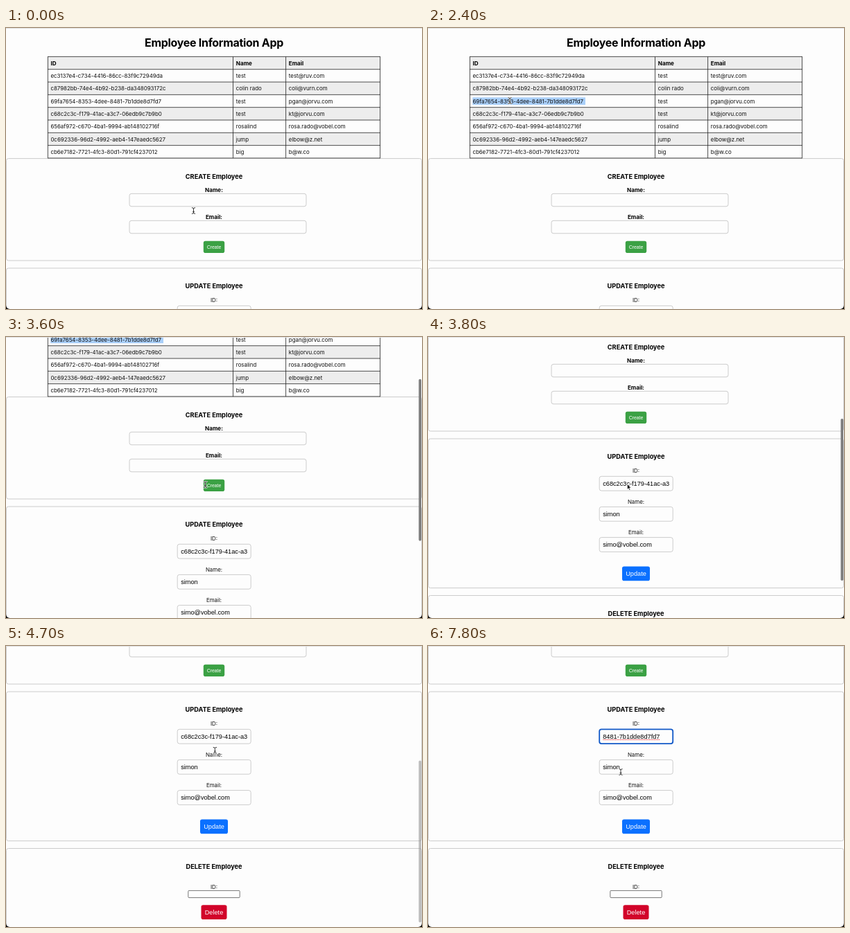
An HTML page that plays this animation: 600x406 px, repeating every 8000 ms.

```html
<!DOCTYPE html>
<html lang="en">
<head>
<meta charset="utf-8">
<title>Employee Information App</title>
<style>
  html, body { margin: 0; height: 100%; overflow: hidden; background: #fdfdfd; }
  svg { display: block; width: 100%; height: 100%; }
  text { font: 7.9px Inter, Roboto, sans-serif; fill: #111; white-space: pre; }
  .mid { text-anchor: middle; }
  .bold { font-weight: 700; font-size: 8.1px; fill: #000; }
  .h1 { font-weight: 700; font-size: 16px; letter-spacing: -.3px; fill: #000; }
  .h3 { font-weight: 700; font-size: 9.2px; fill: #000; }
  .field { font: 9.2px "Liberation Sans", Arial, sans-serif; fill: #000; }
  .button { font: 9.2px "Liberation Sans", Arial, sans-serif; fill: #fff; }
  .small { font-size: 6.9px; }
</style>
</head>
<body>
<svg id="stage" viewBox="0 0 600 406"></svg>
<script>
const LOOP = 8000, STEP = 100;
const stage = document.getElementById('stage');

function add(parent, tag, attrs, content) {
  const node = document.createElementNS('http://www.w3.org/2000/svg', tag);
  for (const key in attrs) node.setAttribute(key, attrs[key]);
  if (content !== undefined) node.textContent = content;
  parent.appendChild(node);
  return node;
}
const page = add(stage, 'g', {});
const rect = (x, y, width, height, attrs) => add(page, 'rect', { x, y, width, height, ...attrs });
const text = (x, y, content, cls = '') => add(page, 'text', { x, y, class: cls }, content);
const label = (y, content, cls = '') => text(300, y, content, 'mid ' + cls);
const line = (x1, y1, x2, y2) => add(page, 'line', { x1, y1, x2, y2, stroke: '#222', 'stroke-width': .8 });
const box = (x, y, w, h, stroke = '#ccc', rx = 3) =>
  rect(x, y, w, h, { rx, fill: '#fdfdfd', stroke, 'stroke-width': 1 });
const highlight = (y, h) => rect(0, y, 0, h, { fill: '#a9cff9' });

function button(y, w, h, color, content, baseline, cls = '') {
  rect(300 - w / 2, y, w, h, { rx: 2.8, fill: color });
  label(baseline, content, 'button ' + cls);
}

// Employee table
const rows = [
  ['ID', 'Name', 'Email'],
  ['ec3137e4-c734-4416-86cc-83f9c72949da', 'test', 'test@ruv.com'],
  ['c87982bb-74e4-4b92-b238-da348093172c', 'colin rado', 'coli@vurn.com'],
  ['69fa7654-8353-4dee-8481-7b1dde8d7fd7', 'test', 'pgan@jorvu.com'],
  ['c68c2c3c-f179-41ac-a3c7-06edb9c7b9b0', 'test', 'kt@jorvu.com'],
  ['656af972-c670-4ba1-9994-ab148102716f', 'rosalind', 'rosa.rado@vobel.com'],
  ['0c692336-96d2-4992-aeb4-147eaedc5627', 'jump', 'elbow@z.net'],
  ['cb6e7182-7721-4fc3-80d1-791cf4237012', 'big', 'b@w.co']
];
const TOP = 41.4, ROW = 18.32, BOTTOM = TOP + ROW * rows.length;
label(26.8, 'Employee Information App', 'h1');
rows.forEach((_, i) => {
  if (i % 2 === 0) rect(60, TOP + i * ROW, 480, ROW, { fill: '#ededed' });
});
const rowSelection = highlight(100.3, 10.7);
rows.forEach((cells, i) => {
  line(60, TOP + i * ROW, 540, TOP + i * ROW);
  cells.forEach((cell, c) =>
    text([64.4, 331.8, 407.8][c], 53.8 + i * ROW, cell, i ? '' : 'bold'));
});
[60.4, 327.5, 403.6, 539.6].forEach(x => line(x, TOP, x, BOTTOM));

// Create form
box(.5, 188.6, 599, 147.4);
line(60, BOTTOM, 540, BOTTOM);
label(217.6, 'CREATE Employee', 'h3');
label(237.4, 'Name:', 'bold');
box(178, 239.3, 255, 18.5);
label(276.4, 'Email:', 'bold');
box(178, 278.3, 255, 18.5);
button(307.7, 30.4, 17.4, '#3ba144', 'Create', 318.8, 'small');

// Update form
box(.5, 347, 599, 215.6);
label(375.7, 'UPDATE Employee', 'h3');
label(396.1, 'ID:');
const idBox = box(247.2, 401.3, 106, 20.8);
const idSelection = highlight(405, 12.5);
const idText = text(252.2, 414.6, '', 'field');
const spelling = add(page, 'line', {
  x1: 253, y1: 416.4, x2: 334, y2: 416.4, stroke: '#e8343a',
  'stroke-width': 1.1, 'stroke-linecap': 'round', 'stroke-dasharray': '0 1.75'
});
const caret = rect(347.8, 406, .8, 11, { fill: '#000' });
label(440.5, 'Name:');
box(247.2, 445.4, 106, 20.8);
text(252.2, 458.8, 'simon', 'field');
label(484.7, 'Email:');
box(247.2, 489.6, 106, 20.8);
text(252.2, 503, 'simo@vobel.com', 'field');
button(531.4, 40, 20.8, '#0a70ff', 'Update', 545.2);

// Delete form
box(.5, 573.5, 599, 140);
label(602.8, 'DELETE Employee', 'h3');
label(632.4, 'ID:');
box(262.8, 634.4, 74.4, 10.2, '#777', 1.2);
button(655.2, 37, 20.8, '#d2042a', 'Delete', 669);

// Window frame, scrollbar and pointer
const thumb = add(stage, 'rect', { x: 595.3, width: 3.7, height: 234, rx: 1.8, fill: '#7d7d7d' });
add(stage, 'rect', { width: 600, height: 1, fill: '#e2e2e2' });
add(stage, 'path', { d: 'M0 400.5Q.5 405.5 5.5 406H0ZM600 400.5Q599.5 405.5 594.5 406H600Z' });
const pointer = add(stage, 'g', {});
const beam = add(pointer, 'g', { fill: 'none', 'stroke-linecap': 'round' });
[['#fff', 2], ['#222', .9]].forEach(([stroke, width]) => add(beam, 'path', {
  d: 'M-2.2-4.3Q0-4.3 0-3Q0-4.3 2.2-4.3M0-3V3M-2.2 4.3Q0 4.3 0 3Q0 4.3 2.2 4.3M-1 1.4H1',
  stroke, 'stroke-width': width
}));
const arrow = add(pointer, 'path', {
  d: 'M0-.8V7L1.8 5.4L3 8.1L4.3 7.5L3.1 4.9H5.4Z',
  fill: '#111', stroke: '#fff', 'stroke-width': .6
});

// Keys are [time, ...values], joined by straight lines
const pointerPath = [
  [0, 270.5, 264], [100, 188, 153], [200, 188, 153], [500, 150, 126], [800, 122, 107],
  [1000, 118, 105], [2900, 118, 105], [3000, 225, 172], [3100, 287.4, 213.2],
  [4100, 287.4, 213.2], [4500, 296, 172], [4800, 304, 140], [5000, 306, 133.6],
  [6300, 306, 133.6], [6700, 291, 152], [7100, 279, 175], [7300, 278, 181.4], [7500, 278, 182]
];
const scrollPath = [
  [3200, 0], [3300, 8], [3400, 31], [3500, 64], [3600, 102], [3700, 150],
  [3800, 200], [3900, 246], [4000, 275], [4100, 281]
];
const fadePath = [[4400, 1], [5000, 0]];

function sample(keys, t) {
  const next = keys.findIndex(key => key[0] > t);
  if (next === 0) return keys[0].slice(1);
  if (next < 0) return keys[keys.length - 1].slice(1);
  const a = keys[next - 1], b = keys[next];
  const k = (t - a[0]) / (b[0] - a[0]);
  return a.slice(1).map((v, i) => v + (b[i + 1] - v) * k);
}
const show = (node, on) => node.setAttribute('visibility', on ? 'visible' : 'hidden');

function select(node, on, [from, to]) {
  show(node, on);
  node.setAttribute('x', from);
  node.setAttribute('width', to - from);
}

function draw(t) {
  const [scroll] = sample(scrollPath, t);
  const [x, y] = sample(pointerPath, t);
  const focused = t >= 5300, pasted = t >= 6300;

  page.setAttribute('transform', `translate(0 ${-scroll})`);
  thumb.setAttribute('y', 1 + scroll * .585);
  thumb.setAttribute('opacity', t < 3300 ? 0 : sample(fadePath, t)[0]);

  // A double click picks one group, the third click the whole value
  select(rowSelection, t >= 1800, t < 1900 ? [104, 124] : [64.3, 227]);
  select(idSelection, t >= 5400 && !pasted, t < 5500 ? [294, 312] : [252, 348.6]);

  idBox.setAttribute('stroke', focused ? '#1259c8' : '#ccc');
  idBox.setAttribute('stroke-width', focused ? 1.8 : 1);
  idText.textContent = pasted ? '8481-7b1dde8d7fd7' : 'c68c2c3c-f179-41ac-a3';
  show(spelling, t >= 6400);
  show(caret, pasted && Math.floor((t - 6300) / 500) % 2 === 0);

  const overPage = t >= 3700 && t < 4200;
  pointer.setAttribute('transform', `translate(${x} ${y})`);
  show(arrow, overPage);
  show(beam, !overPage);
}

function tick() {
  const t = performance.now() % LOOP;
  draw(Math.floor(t / STEP) * STEP);
  requestAnimationFrame(tick);
}
tick();
</script>
</body>
</html>
```
